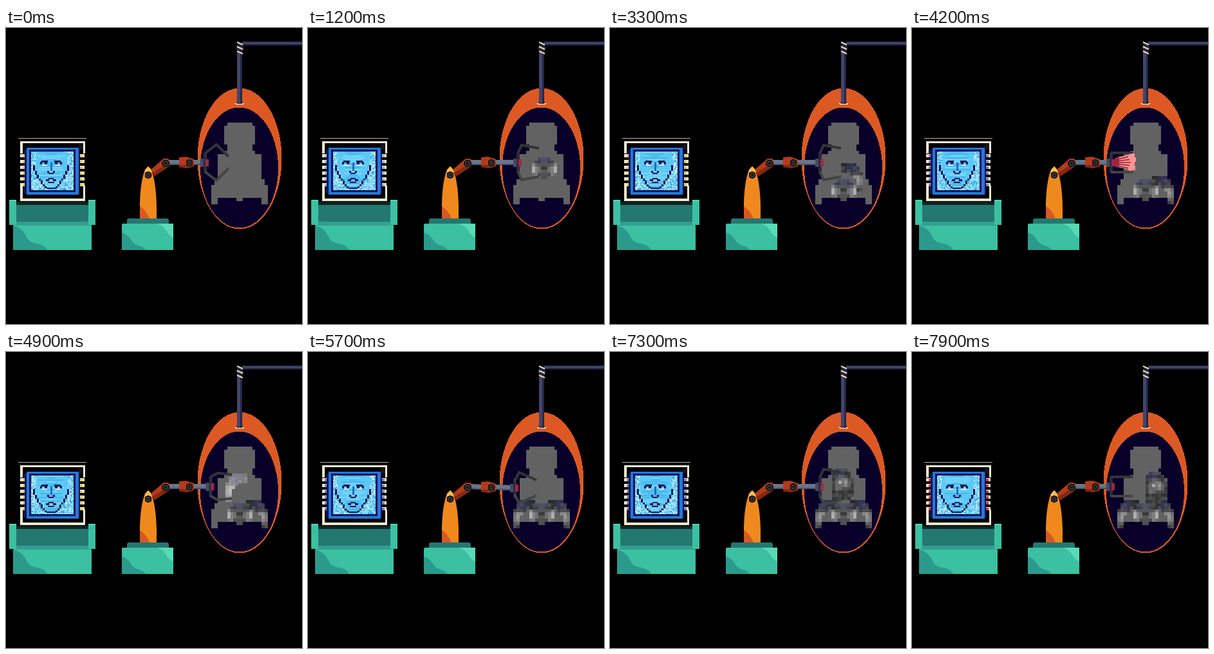
Write an HTML page with a canvas that moves like this. It is 460 px wide and 460 px high and loops after 8000 ms.

```html
<!DOCTYPE html>
<html lang="en">
<head>
<meta charset="utf-8">
<title>Robot assembly</title>
<style>
html, body { margin: 0; width: 100%; height: 100%; overflow: hidden; background: #000; }
canvas { display: block; width: 460px; height: 460px; }
</style>
</head>
<body>
<canvas id="stage" width="460" height="460"></canvas>
<script>
const ctx = document.getElementById('stage').getContext('2d');
const LOOP = 8000, STEP = 100;
const TEAL = '#3bc0a1', DEEP = '#237870', SHADE = '#2b9a8c', CREAM = '#f6ead0';
const NAVY = '#0f1559', BLUE = '#2677db', STEEL = '#68758a', RUST = '#b53a1a';
const PIPE = '#43446a', PIPE_DARK = '#252749';
const AXIS = 363, TOP = 147, CELL = 4.87;

const clamp = v => Math.max(0, Math.min(1, v));
const mix = (a, b, k) => a + (b - a) * k;

function box(x, y, w, h, color) {
  ctx.fillStyle = color;
  ctx.fillRect(x, y, w, h);
}
function shape(d, color) {
  ctx.fillStyle = color;
  ctx.fill(new Path2D(d));
}
// Hard-edged ellipse, one pixel row at a time.
function oval(cx, cy, rx, ry, color) {
  for (let y = Math.ceil(cy - ry); y < cy + ry; y++) {
    const half = rx * Math.sqrt(Math.max(0, 1 - ((y + .5 - cy) / ry) ** 2));
    const left = Math.round(cx - half);
    box(left, y, Math.round(cx + half) - left, 1, color);
  }
}
function line(points, color, width) {
  ctx.strokeStyle = color;
  ctx.lineWidth = width;
  ctx.beginPath();
  points.forEach(([x, y]) => ctx.lineTo(x, y));
  ctx.stroke();
}
function noise(a, b, c) {
  let h = Math.imul(a + 17, 374761393) ^ Math.imul(b + 31, 668265263) ^ Math.imul(c + 7, 1274126177);
  h = Math.imul(h ^ (h >>> 13), 1103515245);
  return ((h ^ (h >>> 16)) >>> 0) / 4294967296;
}

// Cells inside a half outline, whose x runs outwards from the body axis.
function cells(outline, sides) {
  const path = new Path2D(outline), list = [];
  for (let row = 0; row < 26; row++) {
    for (let col = 0; col < 9; col++) {
      const u = (col + .5) * CELL, v = TOP + (row + .5) * CELL;
      if (!ctx.isPointInPath(path, u, v)) continue;
      for (const side of sides) {
        const x = Math.round(AXIS + (side > 0 ? col : -col - 1) * CELL);
        const y = Math.round(TOP + row * CELL);
        list.push({ x, y, u, v, row, col });
      }
    }
  }
  return list;
}
// Random metal greys, brighter around one point and bluish at the joint above it.
function metal(list, [lu, lv], seed) {
  return list.map(c => {
    const r = noise(c.col, c.row, seed);
    const shine = clamp(1.3 - Math.hypot(c.u - lu, c.v - lv) / 12);
    const blue = clamp(1.6 - Math.hypot(c.u - lu + 6, c.v - lv + 20) / 9);
    return { ...c, grey: 40 + 42 * r + shine * (45 + 55 * noise(c.row, c.col, seed)), tint: 28 * blue };
  });
}

const BOTH = [-1, 1];
const body = cells('M0 147H19L25 157V178L21 185V190L34 198V232L44 250V274H33V262H24L15 264H6V269H0Z', BOTH);
const legOutline = 'M9 229H34L44 250V274H33V256L22 246L9 242Z';
const pelvis = metal(cells('M0 234H6L18 244L21 250V263H6V269H0Z', BOTH), [15, 254], 5);
const rightLeg = metal(cells(legOutline, [1]), [35, 255], 9);
const leftLeg = metal(cells(legOutline, [-1]), [35, 255], 9);
const torso = metal(cells('M0 196L8 186H22L30 194L34 204V230L22 234H0Z', [1]), [15, 209], 21);

const jobs = [
  { piece: pelvis, dx: 4, dy: -34, laser: 300, move: 1400, hold: 'straight' },
  { piece: rightLeg, dx: -29, dy: -41, laser: 2000, move: 3200, hold: 'closed' },
  { piece: leftLeg, dx: 22, dy: -41, laser: 4100, move: 5400, hold: 'straight' },
  { piece: torso, dx: -18, dy: -5, laser: 6300, move: 7300, hold: 'straight' }
];

// Prong base y, elbow x/y, tip x/y; the lower prong mirrors the upper one.
const grips = {
  open: [195, 327, 181, 346, 200],
  straight: [194, 326, 194, 343, 194],
  closed: [195, 311, 194, 311, 193],
  grip: [195, 315, 182, 342, 187],
  release: [199, 316, 185, 343, 197]
};
const key = (at, dx, dy, name) => ({ at, v: [dx, dy, ...grips[name]] });
const letGo = at => [key(at, 12, 2, 'release'), key(at + 200, 0, 0, 'open'), key(at + 300, 0, 0, 'straight')];
const keys = [...letGo(-200), ...jobs.flatMap(j => [
  key(j.laser + 100, 0, 0, j.hold), key(j.laser + 700, 0, 0, j.hold),
  key(j.laser + 900, 17, 0, 'grip'), key(j.move + 100, 17, 0, 'grip'),
  ...letGo(j.move + 300)
])];
function poseAt(t) {
  const next = keys.findIndex(k => k.at > t);
  if (next < 0) return keys[keys.length - 1].v;
  const a = keys[next - 1], b = keys[next];
  return a.v.map((v, n) => mix(v, b.v[n], (t - a.at) / (b.at - a.at)));
}

function drawConsole() {
  box(19, 171, 106, 1, '#b8b29f');
  box(22, 176, 101, 93, CREAM);
  box(26, 179, 94, 86, '#000');
  box(113, 180, 7, 9, '#15151a');
  box(28, 189, 87, 68, NAVY);
  box(32, 186, 81, 73, BLUE);
  box(36, 189, 72, 66, NAVY);
  box(16, 270, 112, 5, '#0d2524');
  box(16, 275, 112, 26, DEEP);
  box(11, 301, 122, 6, '#359d90');
  for (const x of [5, 128]) {
    box(x, 267, 11, 39, TEAL);
    box(x, 267, 11, 2, '#55d5b4');
  }
  box(11, 307, 122, 38, TEAL);
  shape('M11 307Q26 311 31 323Q35 334 49 335Q61 338 64 345H11Z', SHADE);
}

function drawLights(frame) {
  const n = frame % 16;
  const color = n < 7 ? '#e2cc58' : n < 11 ? '#7f78b4' : n < 14 ? '#a9b4b8' : '#c5363c';
  box(22, 195, 4, 50, '#000');
  box(120, 195, 3, 50, '#000');
  for (let y = 196; y < 245; y += 9) {
    box(22, y, 7, 5, CREAM);
    box(26, y + 1, 3, 4, color);
    box(115, y, 7, 5, CREAM);
    box(115, y + 1, 4, 4, color);
  }
}

function drawFace(frame) {
  const jaw = y => 27 - 20 * clamp((y - 213) / 36) ** 1.5;
  const pair = (x, y, w, h, color = NAVY) => {
    box(70 + x, y, w, h, color);
    box(70 - x - w, y, w, h, color);
  };
  box(39, 192, 66, 60, '#5cc8f5');
  for (let y = 192; y < 252; y += 3) {
    const w = 12 + Math.floor(noise(y, frame, 3) * 32);
    box(70 - w / 2, y, w, 2, noise(y, frame, 4) < .5 ? '#7ad5f8' : '#48b6ee');
  }
  for (let y = 192; y < 252; y += 1.5) {
    for (let x = 39; x < 105; x += 1.5) {
      const r = noise(x * 2, y * 2, frame);
      if (Math.abs(x - 70) < jaw(y) - 2 || r > .62) continue;
      box(x, y, 1.5, 1.5, r < .32 ? '#d8f5ff' : r < .48 ? '#269bdd' : '#8fe0fa');
    }
  }
  for (let y = 213; y < 249; y += 3) {
    const far = Math.round(jaw(y) / 3) * 3;
    pair(far - 2, y, Math.max(3, Math.round(jaw(y) - jaw(y + 3))), 3);
  }
  pair(5, 206, 10, 3);
  pair(6, 209, 4, 3);
  pair(14, 208, 3, 4);
  pair(6, 212, 8, 2, '#d8f5ff');
  pair(3, 222, 3, 3);
  pair(0, 225, 4, 2);
  pair(0, 233, 4, 2);
  pair(3, 235, 5, 3);
  pair(0, 239, 5, 2);
  pair(0, 248, 7, 2);
  box(69, 209, 3, 13, '#216bc0');
}

function drawPod() {
  oval(363, 203, 65.5, 109.5, '#dc5923');
  oval(362.5, 217, 60.5, 93.5, '#09002a');
  oval(363, 117, 7.5, 2.5, CREAM);
  oval(363, 116, 6, 2, '#66301c');
  box(359, 38, 8, 79, PIPE);
  box(364, 38, 3, 79, PIPE_DARK);
  box(367, 21, 93, 6, PIPE_DARK);
  box(367, 22, 93, 3, PIPE);
  oval(363.5, 31, 5.5, 7.5, PIPE_DARK);
  for (const y of [22, 29, 36]) line([[359, y], [368, y + 4]], '#f5dfaa', 2);
  body.forEach(c => box(c.x, c.y, 5, 5, '#626262'));
}

function drawPiece(job, t) {
  const grow = clamp((t - job.laser - 100) / 100);
  if (!grow) return;
  const glow = .78 * clamp((job.laser + 900 - t) / 200);
  const k = clamp((t - job.move) / 200);
  const dx = Math.round(job.dx * (1 - k)), dy = Math.round(job.dy * (1 - k));
  const reach = Math.min(...job.piece.map(c => c.x)) + 50 * grow;
  job.piece.forEach(c => {
    if (c.x > reach) return;
    const v = Math.round(mix(c.grey, 248, glow));
    box(c.x + dx, c.y + dy, 5, 5, `rgb(${v},${v},${Math.round(v + c.tint * (1 - glow))})`);
  });
}

function drawLaser(frame) {
  const shift = frame % 2;
  shape('M315 203L323 200L333 198L341 195H346V201H348V208H346V214H347V221H341V223L333 219L315 215Z', '#ff9292');
  shape('M315 203L322 201V217L315 215Z', '#b32f48');
  for (let i = -2; i <= 2; i++) {
    line([[315, 209 + i * 2], [340 - Math.abs(i) * 2 - shift, 209 + i * 4.5]], '#8f2036', 1.5);
  }
}

function joint(x, y, r) {
  ['#171717', '#363636', '#111'].forEach((color, i) => oval(x, y, r - 2 * i, r - 2 * i, color));
}
function rod(x1, y1, x2, y2) {
  line([[x1, y1], [x2, y2]], STEEL, 8);
  line([[x1, y1 + 3], [x2, y2 + 3]], '#47546c', 2);
}

function drawArm([dx, dy, by, ex, ey, tx, ty]) {
  shape('M182 304H258Q260 304 260 306V345H180V306Q180 304 182 304Z', TEAL);
  shape('M180 318Q190 321 194 329Q198 336 206 338Q214 340 217 345H180Z', SHADE);
  shape('M235 304H260V326Q252 322 249 315Q245 308 235 304Z', '#58dab5');
  shape('M190 296H251L253 298V304H188V298Z', DEEP);
  shape('M208 296V272Q209 238 216 220L221 215L226 220Q233 240 234 275V296Z', '#ef891e');
  shape('M208 277Q217 282 223 296H208Z', '#d75822');
  shape('M216 221L221 215L226 221L227 228H216Z', '#ffbd50');
  shape('M225 220L245 203H252L257 209L252 216L231 230Z', RUST);
  shape('M226 226L250 211L252 216L231 230Z', '#842812');
  joint(221, 228.5, 5.5);
  const bend = dy / 2;
  rod(254, 209, 270, 209 + bend);
  rod(289, 209 + bend, 304 + dx, 209 + dy);
  joint(248, 210.5, 6);
  ctx.save();
  ctx.translate(0, bend);
  shape('M269 201L280 200L292 204V215L281 218L269 216Z', RUST);
  shape('M269 213H292V215L281 218L269 216Z', '#842812');
  joint(285, 209.5, 5.5);
  ctx.restore();
  ctx.save();
  ctx.translate(dx, dy);
  box(302, 203, 6, 13, '#424b61');
  box(307, 194, 5, 31, '#292c3c');
  box(310, 204, 5, 11, '#a0283c');
  line([[309, by], [ex, ey], [tx, ty]], '#343434', 4);
  line([[309, 418 - by], [ex, 418 - ey], [tx, 418 - ty]], '#434343', 4);
  ctx.restore();
}

function draw(now) {
  const frame = Math.floor((now % LOOP) / STEP);
  const t = frame * STEP;
  box(0, 0, 460, 460, '#000');
  drawConsole();
  drawLights(frame);
  drawFace(frame);
  drawPod();
  jobs.forEach(job => drawPiece(job, t));
  drawArm(poseAt(t));
  if (jobs.some(j => t >= j.laser && t < j.laser + 700)) drawLaser(frame);
}

const start = performance.now();
function tick() {
  draw(performance.now() - start);
  requestAnimationFrame(tick);
}
tick();
</script>
</body>
</html>
```
